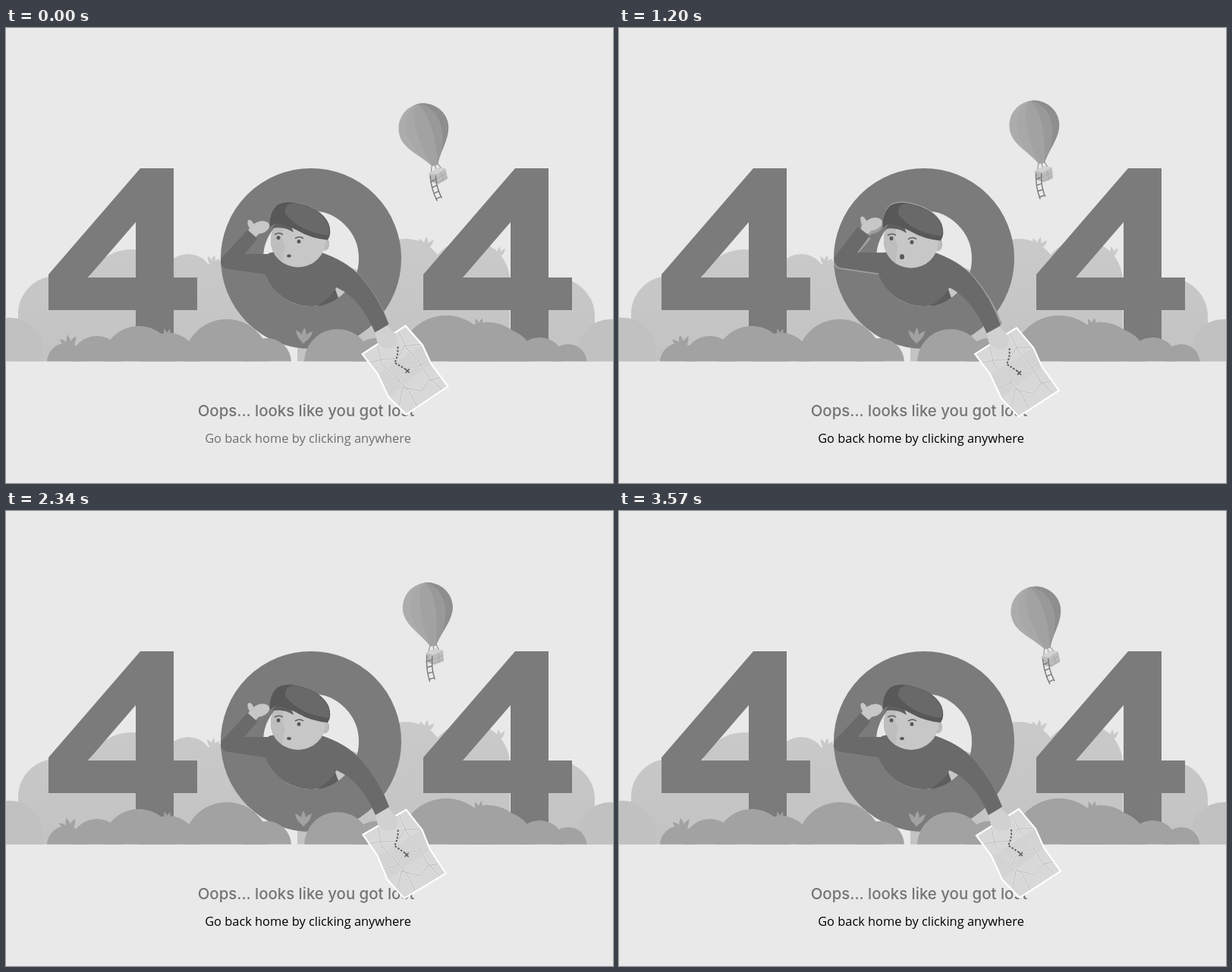
An HTML page with a canvas that plays this animation: 800x600 px, repeating every 3630 ms.

```html
<!DOCTYPE html>
<html lang="en">
<head>
<meta charset="utf-8">
<title>404</title>
<style>
  html, body { margin: 0; width: 100%; height: 100%; overflow: hidden; background: #e9e9e9; }
  p { position: absolute; margin: 0; left: 0; text-align: center; white-space: nowrap; }
  #title { top: 490px; width: 791px; font: 500 20.4px/30px Inter, sans-serif; color: #747474; }
  #hint { top: 526px; width: 796px; font: 400 16.4px/30px "Open Sans", sans-serif; }
  canvas { position: absolute; left: 0; top: 0; }
</style>
</head>
<body>
<p id="title">Oops... looks like you got lost</p>
<p id="hint">Go back home by clicking anywhere</p>
<canvas id="stage" width="800" height="600"></canvas>
<script>
const ctx = document.getElementById('stage').getContext('2d');
const hint = document.getElementById('hint');
const LOOP = 3630, STEP = 30, RAD = Math.PI / 180;
const GROUND = 440, SLEEVE = '#6a6a6a', SKIN = '#c7c7c7';

// Smooth 0-1-0 hump centred on a moment.
const bump = (t, middle, reach) =>
  Math.abs(t - middle) < reach ? Math.cos((t - middle) / reach * Math.PI / 2) ** 2 : 0;

const ramp = (t, from, to) => {
  const u = Math.min(1, Math.max(0, (t - from) / (to - from)));
  return u * u * (3 - 2 * u);
};

function shape(color, d, rule) {
  ctx.fillStyle = color;
  ctx.fill(new Path2D(d), rule);
}

function line(color, width, d, dash = []) {
  ctx.strokeStyle = color;
  ctx.lineWidth = width;
  ctx.setLineDash(dash);
  ctx.stroke(new Path2D(d));
}

function oval(color, x, y, rx, ry = rx, angle = 0) {
  ctx.fillStyle = color;
  ctx.beginPath();
  ctx.ellipse(x, y, rx, ry, angle * RAD, 0, 7);
  ctx.fill();
}

function group(draw) {
  ctx.save();
  draw();
  ctx.restore();
}

function turn(x, y, deg) {
  ctx.translate(x, y);
  ctx.rotate(deg * RAD);
  ctx.translate(-x, -y);
}

function aboveGround(draw) {
  group(() => {
    ctx.beginPath();
    ctx.rect(0, 0, 800, GROUND - .5);
    ctx.clip();
    draw();
  });
}

// Round-topped bush reaching down to the ground.
function dome(color, x, top, r) {
  oval(color, x, top + r, r);
  ctx.fillRect(x - r, top + r, 2 * r, GROUND - top - r);
}

// Row of half discs that shrink in one direction.
function mound(color, x, r, count = 1, dir = 1) {
  for (let i = 0; i < count; i++) {
    oval(color, x, GROUND + 1, r);
    x += dir * r * 1.15;
    r *= .73;
  }
}

function tuft(color, x, y, angle, size, t) {
  const sway = t < 3240 ? 5 * (Math.sin(t / 172 + x) - Math.sin(x)) : 0;
  for (const spread of [-38, 0, 38]) {
    group(() => {
      ctx.translate(x, y);
      ctx.rotate((angle + spread + sway) * RAD);
      ctx.scale(size, size);
      shape(color, 'M0 4Q-7 -8 0 -20Q7 -8 0 4Z');
    });
  }
}

function backdrop(t) {
  const light = ctx.createLinearGradient(0, 290, 0, GROUND);
  light.addColorStop(0, '#c9c9c9');
  light.addColorStop(1, '#c3c3c3');
  tuft(light, 272, 313, 12, .7, t);
  tuft(light, 553, 291, 5, .8, t);
  tuft(light, 650, 301, 0, .65, t);
  aboveGround(() => {
    dome(light, 66, 327, 50);
    dome(light, 165, 292, 60);
    dome(light, 240, 298, 33);
    dome(light, 285, 307, 38);
    dome(light, 440, 314, 56);
    dome(light, 527, 278, 52);
    dome(light, 610, 280, 54);
    dome(light, 726, 330, 50);
    dome('#c1c1c1', 5, 382, 44);
    dome('#c1c1c1', 797, 384, 44);
  });
}

function digits() {
  const gray = '#7b7b7b';
  for (const x of [0, 494]) {
    group(() => {
      ctx.translate(x, 0);
      shape(gray, 'M177 185H221V329H252V372H221V439H171V372H56V325ZM171 256V329H108Z', 'evenodd');
    });
  }
  ctx.beginPath();
  ctx.arc(402, 304, 91, 0, 7);
  ctx.strokeStyle = gray;
  ctx.lineWidth = 56;
  ctx.stroke();
}

function foreground(t) {
  const mid = '#a2a2a2';
  tuft(mid, 84, 422, -10, .9, t);
  tuft(mid, 212, 408, 20, .6, t);
  tuft(mid, 392, 413, 5, .9, t);
  tuft(mid, 624, 396, 15, .7, t);
  tuft(mid, 731, 428, 12, .55, t);
  aboveGround(() => {
    mound(mid, 175, 48, 3, -1);
    mound(mid, 214, 39);
    mound(mid, 291, 57);
    mound(mid, 344, 32);
    mound(mid, 437, 44, 3);
    mound(mid, 580, 62, 4);
    mound(mid, 635, 53);
  });
}

function balloon(t) {
  const angle = t / 1815 * 360;
  const wave = (phase, size) => size * Math.cos((angle + phase) * RAD);
  group(() => {
    ctx.translate(551 + wave(-98, 4.8), 129.2 + wave(20, 3.3));
    ctx.rotate(-(11.8 + wave(25, 5.8)) * RAD);
    line('#858585', 1, 'M-4 50L-8 60M4 50L8 60M0 51V58');
    group(() => {
      ctx.clip(new Path2D('M-4 51C-12 35 -33 20 -33 0A33 33 0 0 1 33 0C33 20 12 35 4 51Z'));
      shape('#acacac', 'M-34 -34H34V52H-34Z');
      shape('#8e8e8e', 'M0 -34H34V52H0Z');
      for (const [color, bulge] of [['#a8a8a8', -30], ['#999', 30], ['#a2a2a2', -13], ['#a2a2a2', 13]]) {
        shape(color, `M0 -34C${bulge} -22 ${bulge} 18 ${Math.sign(bulge) * 3} 52H0Z`);
      }
    });
    shape('#bdbdbd', 'M-11 59L3 55L12 59L11 73L-2 76L-10 72Z');
    shape('#d2d2d2', 'M-11 59L3 55L12 59L-1 63Z');
    line('#929292', .8, 'M-10 65L-2 69L11 65M-9 70L-2 74L11 70M5 63V74', [1, 1]);
    line('#777', 1.4, 'M-10 62Q-14 80 -11 97M-3 64Q-7 80 -4 95');
    for (let y = 70; y < 98; y += 8) line('#777', 1.4, `M-12 ${y}L-5 ${y - 1}`);
  });
}

// Tapered limb with a round joint at its start.
function limb(color, x0, y0, r0, x1, y1, r1) {
  const a = Math.atan2(y1 - y0, x1 - x0) + Math.PI / 2;
  const c = Math.cos(a), s = Math.sin(a);
  oval(color, x0, y0, r0);
  shape(color, `M${x0 + c * r0} ${y0 + s * r0}L${x1 + c * r1} ${y1 + s * r1}
    L${x1 - c * r1} ${y1 - s * r1}L${x0 - c * r0} ${y0 - s * r0}Z`);
}

function leftArm(raise, paint) {
  const elbow = [293 + 4 * raise, 308 - 8 * raise, 10 + raise];
  group(() => {
    ctx.translate(-raise, -17 * raise);
    const skin = paint(SKIN);
    oval(skin, 335, 263, 12.5, 8, -18);
    oval(skin, 323, 260, 3.6, 7.5, -25);
    oval(skin, 326, 269, 7);
  });
  limb(paint(SLEEVE), ...elbow, 325 - 10 * raise, 272 - 15 * raise, 9 + 3 * raise);
  limb(paint(SLEEVE), ...elbow, 348, 312 - 7 * raise, 14);
}

function torso(paint) {
  shape(paint('#5d5d5d'), 'M410 367L433 342L438 356Q426 365 410 367Z');
  shape(paint(SLEEVE), 'M346 297Q380 288 420 298L440 318L435 343Q427 357 411 366Q388 370 366 356Q349 344 342 326Z');
}

function rightArm(paint) {
  shape(paint(SLEEVE), 'M412 295Q448 306 468 328Q492 355 505 390L487 401Q472 367 451 351Q440 342 424 338Z');
}

function head(surprise, paint) {
  const dark = paint('#585858');
  oval(paint('#bcbcbc'), 420, 285, 6, 8);
  oval(paint(SKIN), 385, 280, 36, 35);
  group(() => {
    ctx.clip(new Path2D('M349 250H366L364 277Q370 289 366 294L364 315H349Z'));
    oval(paint('#bebebe'), 385, 280, 36, 35);
  });
  shape(paint('#5f5f5f'), 'M350 264L360 250L394 261V268Q385 267 376 261L379 269Q365 260 350 264Z');
  shape(dark, 'M348 262Q346 244 357 233Q366 228 377 229Q414 235 425 257Q430 270 424 279Q402 277 385 267Q367 257 355 257Z');
  shape(paint('#696969'), 'M368 244Q367 232 378 230Q413 236 424 257Q428 266 425 273Q386 268 368 244Z');
  for (const [x, y] of [[359, 276], [386, 281]]) {
    oval(dark, x, y, 2.4, 2.6 + .4 * surprise);
    line(paint('#616161'), 1.6, `M${x - 5} ${y - 4}Q${x + 1} ${y - 8} ${x + 6} ${y - 4}`);
  }
  oval(dark, 373, 300 + .5 * surprise, 2.8 + .5 * surprise, 2 + 2.8 * surprise);
}

function boy({ raise, sway, surprise }, silhouette) {
  const paint = color => silhouette || color;
  leftArm(raise, paint);
  torso(paint);
  group(() => {
    turn(420, 315, 4 * sway);
    rightArm(paint);
  });
  group(() => {
    ctx.translate(0, 3.8 * sway);
    head(surprise, paint);
  });
}

function roadMesh() {
  let seed = 7;
  const random = () => (seed = seed * 16807 % 2147483647) / 2147483647;
  const node = () => (u, v) => `${471 + 57 * (u + v)} ${428 - 35 * u + 82 * v}`;
  const at = node();
  let d = '';
  for (let i = 1; i < 4; i++) {
    const across = [], along = [];
    for (let j = 0; j <= 4; j++) {
      const jitter = i / 4 + (random() - .5) * .22;
      across.push(at(j / 4, jitter));
      along.push(at(i / 4 + (random() - .5) * .22, j / 4));
    }
    d += 'M' + across.join('L');
    if (i !== 2) d += 'M' + along.join('L');
  }
  return d;
}
const roads = roadMesh();

const axes = (a, b) => new DOMMatrix([Math.cos(a * RAD), Math.sin(a * RAD), Math.cos(b * RAD), Math.sin(b * RAD), 0, 0]);
const REST_X = 22.6, REST_Y = 90;
const uprightMap = axes(REST_X, REST_Y).inverse();

function mapSheet(t) {
  const swing = bump(t, 1500, 450) + bump(t, 2400, 450) - 2 * bump(t, 1950, 450);
  const late = bump(t, 2950, 450);
  const m = axes(
    REST_X - 9 * bump(t, 500, 750) + 2.4 * swing - 3 * late,
    REST_Y - 8 * bump(t, 700, 700) + 2 * swing - 2 * late
  ).multiply(uprightMap);
  const outline = 'M471 428L527 393L549 419L560 444L582 475L528 510L505 486L491 455Z';
  ctx.translate(503, 408);
  ctx.transform(m.a, m.b, m.c, m.d, 0, 0);
  ctx.translate(-503, -408);
  shape('#d8d8d8', outline);
  group(() => {
    ctx.clip(new Path2D(outline));
    shape('#d3d3d3', 'M491 455L549 419L560 444L505 486Z');
    line('#dfdfdf', 3, roads);
    line('#bebebe', 1, roads);
  });
  line('#fff', 2.2, outline);
  line('#5d5d5d', 2, 'M517 420Q518 431 513 441L527 450', [2.5, 2]);
  line('#5d5d5d', 1.6, 'M527 450L532 455M532 450L527 455');
}

function handWithMap(t, sway) {
  group(() => {
    turn(420, 315, 4 * sway);
    group(() => {
      turn(503, 408, -4 * sway);
      mapSheet(t);
    });
    shape('#d1d1d1', 'M487 401L504 392Q509 398 515 403Q519 414 513 419Q508 424 503 421Q493 420 490 413Z');
  });
}

function render(t) {
  const pose = {
    raise: ramp(t, 0, 270) - ramp(t, 900, 1350) + .1 * bump(t, 2080, 300),
    sway: .8 * bump(t, 330, 450) + bump(t, 1510, 540),
    surprise: bump(t, 840, 700)
  };
  ctx.clearRect(0, 0, 800, 600);
  backdrop(t);
  digits();
  foreground(t);
  balloon(t);
  boy({ raise: 0, sway: 0, surprise: 0 }, '#9e9e9e');
  boy(pose);
  handWithMap(t, pose.sway);
  const ink = Math.round(110 * (1 - ramp(t, 0, 300)));
  hint.style.color = `rgb(${ink},${ink},${ink})`;
}

const start = performance.now();
function frame() {
  const t = (performance.now() - start) % LOOP;
  render(Math.min(Math.floor(t / STEP) * STEP, LOOP - 2 * STEP));
  requestAnimationFrame(frame);
}
frame();
</script>
</body>
</html>
```
